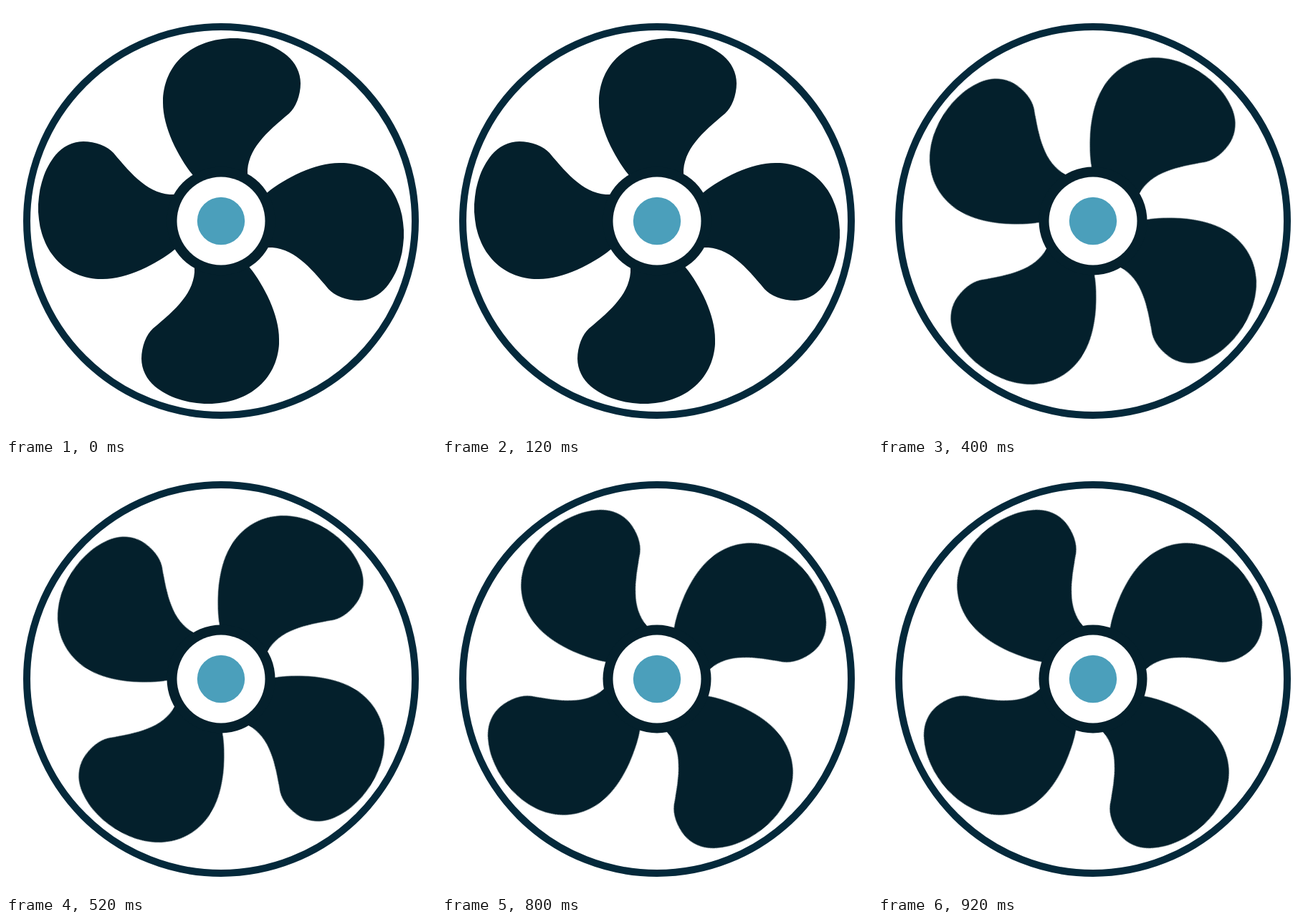
An HTML page for the animation above (1 s loop, 600 by 600 pixels).

```html
<!DOCTYPE html>
<html lang="en">
<head>
<meta charset="utf-8">
<title>Fan</title>
<style>
  html, body { margin: 0; width: 100%; height: 100%; overflow: hidden; background: #fff; }
  svg { display: block; width: 100%; height: 100%; }
</style>
</head>
<body>
<svg viewBox="-300 -300 600 600">
  <defs>
    <path id="blade" d="M0 0 L-40 -65
      C-60 -90 -81 -131 -81 -165
      C-81 -219 -40 -255 18 -255
      C47 -255 74 -246 92 -231
      C104 -221 111 -207 111 -192
      C111 -175 104 -158 95 -150
      C64 -124 36 -100 37 -65 Z"/>
  </defs>
  <circle r="271" fill="none" stroke="#04293b" stroke-width="10"/>
  <g id="rotor" fill="#04202c">
    <use href="#blade"/>
    <use href="#blade" transform="rotate(90)"/>
    <use href="#blade" transform="rotate(180)"/>
    <use href="#blade" transform="rotate(270)"/>
  </g>
  <circle r="75.5" fill="#04202c"/>
  <circle r="61.5" fill="#fff"/>
  <circle r="33.2" fill="#4b9fbb"/>
</svg>
<script>
  const LOOP = 1000;
  // Rotor angle in degrees, each held for an equal share of the loop
  const angles = [0, 15, 30, 41, 50];

  const frames = angles.map((a, i) => ({
    offset: i / angles.length,
    transform: `rotate(${a}deg)`,
    easing: 'steps(1, end)'
  }));
  frames.push({ offset: 1, transform: `rotate(${angles.at(-1)}deg)` });

  document.getElementById('rotor').animate(frames, { duration: LOOP, iterations: Infinity });
</script>
</body>
</html>
```
